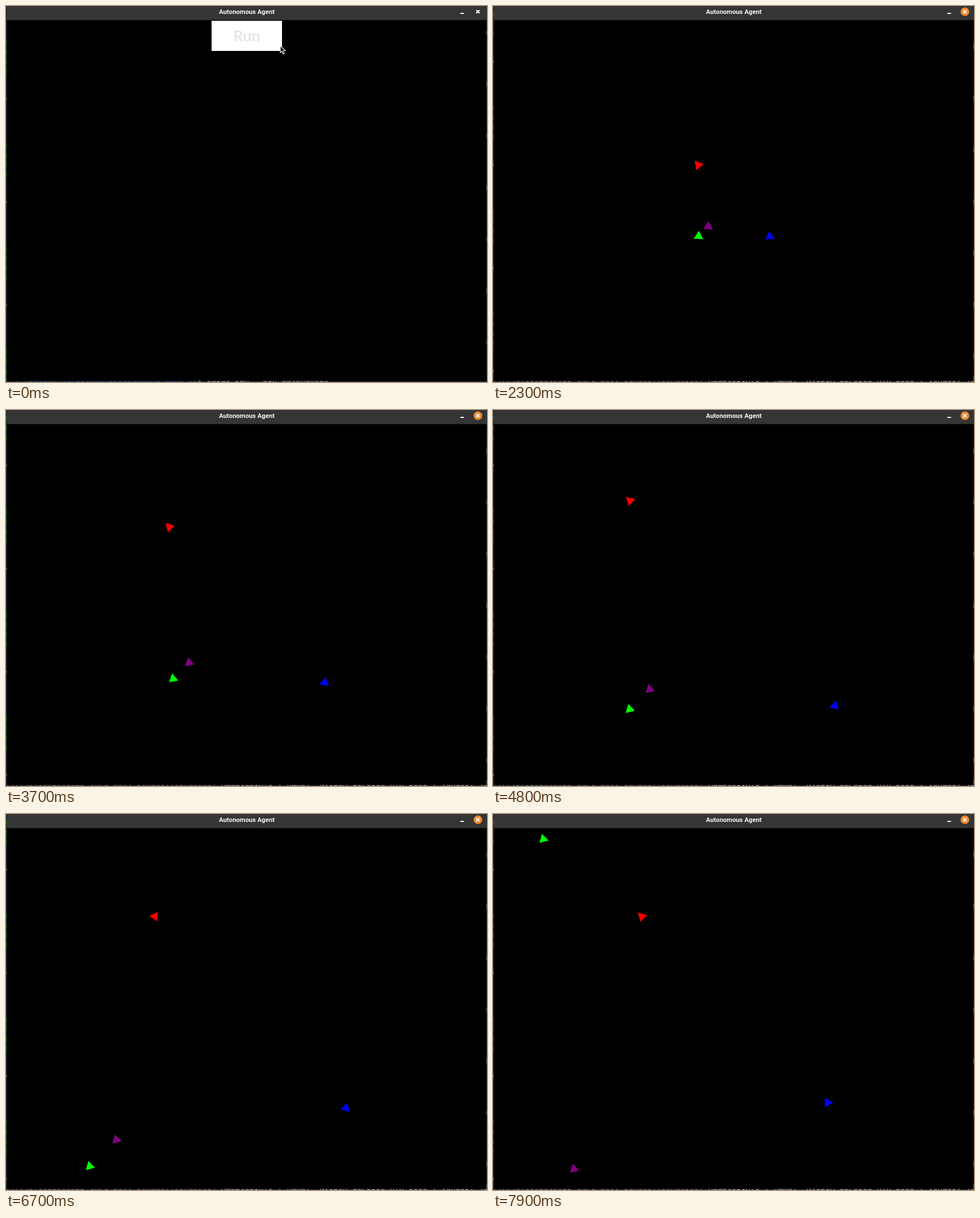
An HTML page with a canvas that plays this animation: 847 by 661 pixels, repeating every 8000 ms.

```html
<!DOCTYPE html>
<html lang="en">
<head>
<meta charset="utf-8">
<title>Autonomous Agent</title>
<style>
  html, body { margin: 0; width: 100%; height: 100%; overflow: hidden; background: #000; }
  canvas { display: block; }
</style>
</head>
<body>
<canvas id="stage" width="847" height="661"></canvas>
<script>
const ctx = document.getElementById('stage').getContext('2d');
// Times are in seconds, speeds in pixels per second along each axis.
const LOOP = 8, STEPS_PER_SECOND = 10;
const RUN_AT = 0.5, POINTER_GONE = 1.3;
const TOP = 25, BOTTOM = 659, LEFT = 2, RIGHT = 846;
const CENTER = { x: 424.3, y: 342.4 };
const TURN_TIME = 0.9, RADIUS = 9.6;

// ramp: time taken to pick up speed. brake: where to stop and drift back.
// turn: a late rotation in degrees between two times.
const agents = [
  { color: '#f00', dx: -1, dy: -1, from: -90, to: -135, speed: 54.5, ramp: 0.7,
    brake: { at: 4.25, decel: 88, back: 21, time: 1 },
    turn: { start: 4.9, end: 7.9, degrees: 120 } },
  { color: '#00f', dx: 1, dy: 1, from: -90, to: 45, speed: 54.5, ramp: 0.7,
    brake: { at: 3.7, decel: 31.4, back: 19, time: 2.5 },
    turn: { start: 6.7, end: 7.9, degrees: -45 } },
  { color: '#0f0', dx: -1, dy: 1, from: 270, to: 135, speed: 49, ramp: 0.55 },
  { color: '#800080', dx: -1, dy: 1, from: 270, to: 136, speed: 43, ramp: 0.85 }
];

const progress = (t, start, end) => Math.min(1, Math.max(0, (t - start) / (end - start)));
const ease = u => (1 - Math.cos(Math.PI * u)) / 2;
const mix = (a, b, u) => a + (b - a) * u;

function cruise({ speed, ramp }, t) {
  const u = t - RUN_AT;
  return speed * (u - ramp * (1 - Math.exp(-u / ramp)));
}

function distance(agent, t) {
  const { brake, speed } = agent;
  if (!brake || t < brake.at) return cruise(agent, t);
  const stopTime = speed / brake.decel;
  const u = Math.min(t - brake.at, stopTime);
  const stop = brake.at + stopTime;
  return cruise(agent, brake.at) + speed * u - brake.decel * u * u / 2
    - brake.back * ease(progress(t, stop, stop + brake.time));
}

function heading({ from, to, turn }, t) {
  const late = turn ? turn.degrees * ease(progress(t, turn.start, turn.end)) : 0;
  return to + (from - to) * Math.exp((RUN_AT - t) / TURN_TIME) + late;
}

function rect(color, x, y, w, h) {
  ctx.fillStyle = color;
  ctx.fillRect(x, y, w, h);
}

function text(str, x, y, font, color, align = 'left') {
  ctx.font = font;
  ctx.fillStyle = color;
  ctx.textAlign = align;
  ctx.fillText(str, x, y);
}

function polygon(points) {
  ctx.beginPath();
  points.forEach(([x, y]) => ctx.lineTo(x, y));
  ctx.closePath();
}

// Slivers of a terminal that stays visible around the window.
function drawTerminal(started) {
  const mono = '13.75px "Noto Sans Mono", monospace';
  const block = 181.4, scroll = started ? -66 : 0;
  rect('#1c2022', 0, 0, 847, 661);
  for (let k = 0; k < 5; k++) {
    const y = k * block + scroll;
    for (let line = 0; line < 4; line++) rect('#2a6a08', 0, y + 60 + 17 * line, 1, 8);
    rect('#aaa', 0, y + 162, 1, 3);
    for (let half = 0; half < 2; half++) rect('#777', 846, y + 43 + half * block / 2, 1, 8);
  }
  if (started) {
    text('INFO bevy_render::renderer: ', 379, 661, mono, '#777', 'right');
    text('2022-07-17T17:47:45.105261352Z ', 147, 661, mono, '#777', 'right');
    text('AdapterInfo { name: "NVIDIA GeForce RTX 3080", vendor: 43', 379, 661, mono, '#aaa');
  } else {
    text(':~/Documents/github/programming-game-ai', 337, 661, mono, '#2f5a90', 'right');
    text('$ cargo run --bin autonomous', 337, 661, mono, '#aaa');
  }
}

function drawWindow(focused) {
  rect('#000', LEFT, TOP, RIGHT - LEFT, BOTTOM - TOP);
  rect('#353535', 1, 0, 846, TOP);
  rect('#2a2a2a', 1, TOP - 1, 846, 1);
  text('Autonomous Agent', 424, 14, '600 11.3px Roboto, sans-serif', '#f5f5f5', 'center');
  rect('#f2f2f2', 800, 12, 6.5, 2);
  if (focused) {
    ctx.fillStyle = '#f08a30';
    ctx.beginPath();
    ctx.arc(831, 10, 7.6, 0, Math.PI * 2);
    ctx.fill();
  }
  ctx.strokeStyle = '#fff';
  ctx.lineWidth = 2;
  ctx.beginPath();
  for (const side of [-1, 1]) {
    ctx.moveTo(831 - 2.8 * side, 7.2);
    ctx.lineTo(831 + 2.8 * side, 12.8);
  }
  ctx.stroke();
}

function drawButton() {
  rect('#fff', 362, 26, 124, 53);
  text('Run', 424, 62, '700 27.5px Lato, sans-serif', '#e6e6e6', 'center');
}

function drawAgent(agent, t) {
  const d = distance(agent, t), angle = heading(agent, t);
  const x = CENTER.x + agent.dx * d;
  const y = TOP + (CENTER.y + agent.dy * d - TOP) % (BOTTOM - TOP);
  polygon([0, 120, 240].map(corner => {
    const a = (angle + corner) * Math.PI / 180;
    return [x + RADIUS * Math.cos(a), y + RADIUS * Math.sin(a)];
  }));
  ctx.fillStyle = agent.color;
  ctx.fill();
}

// Moves onto the button, clicks, then leaves through the title bar.
function drawPointer(t) {
  const enter = progress(t, 0.1, 0.3), leave = progress(t, RUN_AT, 1.2);
  ctx.save();
  ctx.translate(mix(mix(482.5, 460.5, enter), 501.5, leave), mix(mix(69, 60, enter), 0, leave));
  polygon([[0.5, 1], [0.5, 13], [3.3, 10.5], [5.4, 15.5], [7.6, 14.5], [5.5, 9.8], [9.4, 9.5]]);
  ctx.fillStyle = '#000';
  ctx.fill();
  ctx.strokeStyle = '#fff';
  ctx.lineWidth = 1.1;
  ctx.stroke();
  ctx.restore();
}

function draw(t) {
  const running = t >= RUN_AT;
  drawTerminal(running);
  drawWindow(running);
  if (running) {
    ctx.save();
    ctx.beginPath();
    ctx.rect(LEFT, TOP, RIGHT - LEFT, BOTTOM - TOP);
    ctx.clip();
    agents.forEach(agent => drawAgent(agent, t));
    ctx.restore();
  } else {
    drawButton();
  }
  if (t < POINTER_GONE) drawPointer(t);
}

const start = performance.now();
function tick() {
  const t = (performance.now() - start) / 1000 % LOOP;
  draw(Math.floor(t * STEPS_PER_SECOND) / STEPS_PER_SECOND);
  requestAnimationFrame(tick);
}
tick();
</script>
</body>
</html>
```
